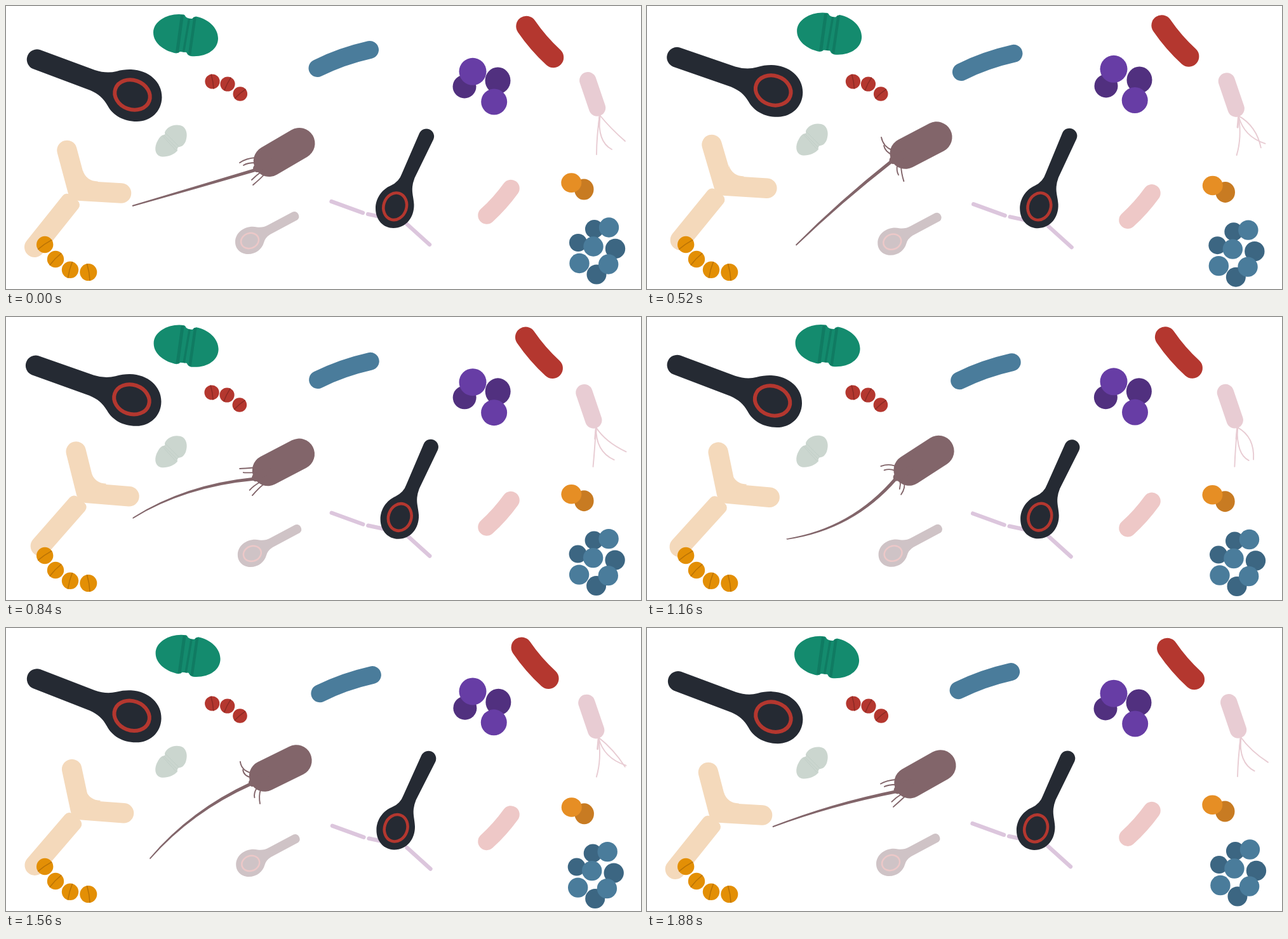
Write an HTML page with a canvas that moves like this. It is 1000 by 446 pixels and loops after 1920 ms.

```html
<!DOCTYPE html>
<html lang="en">
<head>
<meta charset="utf-8">
<title>Microbes</title>
<style>
  html, body { margin: 0; width: 100%; height: 100%; overflow: hidden; background: #fff; }
  canvas { display: block; width: 100vw; height: 100vh; }
</style>
</head>
<body>
<canvas id="stage" width="1000" height="446"></canvas>
<script>
const ctx = document.getElementById('stage').getContext('2d');
const LOOP = 1920, STEP = 40;
const INK = '#252a33', RED = '#b4372f', BLUE = '#4a7c9b', DEEP_BLUE = '#3c6682';
const PURPLE = '#673da5', DEEP_PURPLE = '#51307f', BROWN = '#82656a', ROSE = '#e8ccd3';
const SAND = '#f4d9bb', GREEN = '#148b6e', DEEP_GREEN = '#107b62', LILAC = '#dcc6dd';
const PALE_GREEN = '#cbd6cf', MAUVE = '#cfc3c6', ORANGE = '#e38f05';

// Eased 0..1..0 swing plus the matching quarter-phase term.
const wave = angle => ({ swing: (1 - Math.cos(angle)) / 2, side: Math.sin(angle) });
let slow, fast;

const point = (w, x, y, dx = 0, dy = 0, sx = 0, sy = 0) =>
  [x + dx * w.swing + sx * w.side, y + dy * w.swing + sy * w.side];

function fill(shape, color) {
  ctx.fillStyle = color;
  ctx.fill(new Path2D(shape));
}

function stroke(shape, color, width, cap = 'round') {
  ctx.strokeStyle = color;
  ctx.lineWidth = width;
  ctx.lineCap = cap;
  ctx.lineJoin = 'round';
  ctx.stroke(new Path2D(shape));
}

function blob(x, y, rx, color, ry = rx) {
  ctx.fillStyle = color;
  ctx.beginPath();
  ctx.ellipse(x, y, rx, ry, 0, 0, 7);
  ctx.fill();
}

function ring(x, y, rx, ry, degrees, color, width) {
  ctx.strokeStyle = color;
  ctx.lineWidth = width;
  ctx.beginPath();
  ctx.ellipse(x, y, rx, ry, degrees * Math.PI / 180, 0, 7);
  ctx.stroke();
}

function moved(w, dx, dy, draw, turn = { side: 0, swing: 0, x: 0, y: 0 }) {
  const degrees = turn.side * w.side + turn.swing * w.swing;
  ctx.save();
  ctx.translate(dx * w.swing + turn.x, dy * w.swing + turn.y);
  ctx.rotate(degrees * Math.PI / 180);
  ctx.translate(-turn.x, -turn.y);
  draw();
  ctx.restore();
}

const line = (a, b) => `M${a}L${b}`;
const curve = (a, control, b) => `M${a}Q${control} ${b}`;

function bead(x, y, r, angle, color, groove) {
  const dx = r * Math.cos(angle), dy = r * Math.sin(angle);
  blob(x, y, r, color);
  stroke(curve([x - dx, y - dy], [x + dy * .12, y - dx * .12], [x + dx, y + dy]), groove, 1.5, 'butt');
}

function clubs() {
  moved(slow, -1.5, -9.3, () => {
    fill('M53.5 69L140 101Q158 107 174 103C182 100.5 190 99.8 197 100C225 101 246 120 245.5 144' +
      'C245 167 227 182 206 182C185 182 168 172 160 157C153 145 146 139 133 133L42.5 99A16 16 0 0 1 53.5 69Z', INK);
    ring(199, 140, 28.3, 23, 20, RED, 6);
  }, { side: -1.1, swing: -.5, x: 125, y: 115 });

  moved(slow, 7.5, -.5, () => {
    fill('M651 200.5L623.5 264Q619 277 606 283C592 289 582 303 582 319C582 338 595 350 610 350' +
      'C630 350 643 333 642.5 313C642 302 639 295 640 285Q640.5 279 643.5 271L673 210.5A12 12 0 0 0 651 200.5Z', INK);
    ring(612.7, 315.8, 18, 21.6, 18, RED, 4.6);
  }, { side: -1, swing: 0, x: 637, y: 262 });

  moved(slow, 4, 3, () => {
    fill('M451.5 324.5L413 345Q404 350 395 348.5C378 345 361 356 361 372C361 384 371 391 381 391' +
      'C394 391 403 383 406 373Q408 365 416 360L459 337A7.5 7.5 0 0 0 451.5 324.5Z', MAUVE);
    ring(384, 370, 14.2, 11.8, -20, '#ecc8c8', 2.5);
  });
}

function dividingCells() {
  moved(fast, 4.2, -2.5, () => {
    fill('M280 13.5C258 10 232 22 232 42C232 60 252 72 268 74.5Q272 74 274 72L284 73Q286 78 291 79' +
      'C315 81 334 69 334 51C334 34 318 20 299 16.5Q295 17 293 20Q286 20 283 17Q282 14 280 13.5Z', GREEN);
    stroke('M277.5 14.5L269.5 73', DEEP_GREEN, 5, 'butt');
    stroke('M288.5 20L279.5 72.5', DEEP_GREEN, 3.5, 'butt');
    stroke('M297.5 18L289 77', DEEP_GREEN, 4.5, 'butt');
  });
  moved(fast, 0, -2, () => {
    fill('M250 199C254 190 264 186 274 188C284 190 287 202 283 213C280 220 276 222 272 222Q269 224 270 228' +
      'C264 235 252 239 243 237C234 234 233 222 239 212C242 206 246 203 249 203Q251 202 250 199Z', PALE_GREEN);
    stroke('M251 200L272 221M249 204L269 224M247 205L267 227', '#c1cec7', 1);
  });
}

function rods() {
  moved(fast, 4.5, 6, () => stroke('M490.5 98Q528.5 79 573 69', BLUE, 28));
  moved(fast, -9, -1.5, () => stroke('M819.5 32Q838 59 862 81', RED, 32.5));
  moved(fast, 0, 7.5, () => stroke('M757 330Q778 311 795 287.5', '#eec8c7', 27.5));
  moved(fast, 1.7, 4.3, () =>
    stroke('M512.5 308L562 326M570 328L612 337M630 342.5L667 376', LILAC, 6.3));
}

function clusters() {
  moved(fast, 1, -1, () => {
    blob(722, 127, 18.5, DEEP_PURPLE);
    blob(774.5, 117.5, 20, DEEP_PURPLE, 21);
  });
  moved(fast, 0, -4, () => blob(735, 103.3, 21.5, PURPLE));
  moved(fast, -.5, -2.5, () => blob(768.7, 151, 20.5, PURPLE));

  moved(fast, .5, 4.5, () => {
    blob(910.2, 289, 15.3, '#c87b22', 16.5);
    blob(890.3, 278.6, 16, '#e68e24', 15.3);
  });

  moved(fast, -2.7, 4.2, () => {
    for (const [x, y, r] of [[926.5, 351.5, 14.5], [901, 373, 14], [959.5, 382.5, 15.7], [930, 423, 15.5]])
      blob(x, y, r, DEEP_BLUE);
    for (const [x, y] of [[949.5, 349], [925, 379], [903, 405.5], [948.7, 407]])
      blob(x, y, 15.7, BLUE);
  });
}

function branchedCell() {
  const top = point(slow, 96, 227.5, 16, -16, -3);
  const joint = point(slow, 113, 291, 14, -14.3);
  const right = point(slow, 181.5, 295, 13, -12.5, 0, -.7);
  stroke(line(top, joint) + 'L' + right, SAND, 31.5);
  const [x, y] = joint;
  fill(`M${x + 7.5} ${y - 33}Q${x + 13} ${y - 15} ${x + 32} ${y - 14.5}L${x + 12} ${y}Z`, SAND);

  const foot = point(slow, 45, 380, 9, -19.7, 2.5);
  const head = point(slow, 104, 306, 11.5, -14.5);
  ctx.save();
  ctx.translate(...foot);
  ctx.rotate(Math.atan2(head[1] - foot[1], head[0] - foot[0]));
  ctx.fillStyle = SAND;
  ctx.beginPath();
  ctx.roundRect(-16, -16, Math.hypot(head[0] - foot[0], head[1] - foot[1]) + 21, 32, [16, 9, 9, 16]);
  ctx.fill();
  ctx.restore();
}

function beads() {
  moved(slow, -1, 0, () => {
    bead(325, 119, 11.6, 1.4, RED, '#8c2a24');
    bead(349, 123, 11.6, -1.1, RED, '#8c2a24');
    bead(368.8, 138.5, 11.3, -.7, RED, '#8c2a24');
  });
  bead(61.2, 376, 13.2, -.6, ORANGE, '#b97205');
  bead(78, 399, 13.2, -.8, ORANGE, '#b97205');
  bead(101, 415.8, 13.2, -1.3, ORANGE, '#b97205');
  bead(129.8, 419.6, 13.5, 1.4, ORANGE, '#b97205');
}

function brownSwimmer() {
  const p = (...args) => point(fast, ...args);
  const rear = p(414.2, 244.5, -7, -12, 1.3, 1.3);
  const front = p(462, 216.5, -6.2, -10.3, -.6, -1.5);
  const base = p(394, 258, -7.5, -14, 1.3, 1.3);
  const bend = p(296, 287, 14, 32, 23, 37);
  const tip = p(199, 315, 38, 66, 7, 11);

  const reach = Math.hypot(bend[0] - base[0], bend[1] - base[1]);
  const nx = (base[1] - bend[1]) / reach, ny = (bend[0] - base[0]) / reach;
  const shift = ([x, y], d) => [x + nx * d, y + ny * d];
  fill(curve(shift(base, 2.6), shift(bend, 2.1), shift(tip, 1)) +
    `L${shift(tip, -1)}Q${shift(bend, -2.1)} ${shift(base, -2.6)}Z`, BROWN);

  const cilia = [
    [p(393, 239, -7, -12), p(378, 240, -5, -19, 4, -2), p(368, 247, 1, -40, 0, 3)],
    [p(393, 247, -7, -13), p(380, 247, -4, -18, 4, -2), p(374, 251, -1, -31, 0, 2)],
    [p(401, 262, -7, -12), p(394, 267, 0, -7, 6), p(387, 274, 11, -8, 7)],
    [p(407, 265, -7, -12), p(402, 271, 0, -8, 6), p(389, 282, 17, -6, 5)]
  ];
  for (const hair of cilia) stroke(curve(...hair), BROWN, 1.9);
  stroke(line(rear, front), BROWN, 49);
  stroke(line(rear, p(395, 256, -7.2, -13, 1.3, 1.3)), BROWN, 12);
}

function roseSwimmer() {
  const p = (...args) => point(fast, ...args);
  moved(slow, -6, 2, () => {
    const root = [935, 172];
    stroke(curve(root, p(930, 206, 10, 0, -2), p(930, 234, 2, 0)), ROSE, 1.9);
    stroke(curve(root, p(931, 214, 12, -8, -2, 4), p(954, 226, 21, -10, -9, 2)), ROSE, 1.9);
    stroke(curve(root, p(952, 193, 13, -6, 6, -4), p(975, 213, -8, 11, -12, 6)), ROSE, 1.9);
    stroke('M935 173L933.5 190', ROSE, 3);
    stroke('M916.3 117.3L931 160.5', ROSE, 26.5);
  });
}

function render(time) {
  const phase = Math.floor(time % LOOP / STEP) * STEP / LOOP * 2 * Math.PI;
  slow = wave(phase);
  fast = wave(phase * 2);
  ctx.clearRect(0, 0, 1000, 446);
  for (const draw of [rods, clubs, dividingCells, clusters, branchedCell, beads, brownSwimmer, roseSwimmer]) draw();
}

const start = performance.now();
function tick() {
  render(performance.now() - start);
  requestAnimationFrame(tick);
}
tick();
</script>
</body>
</html>
```
